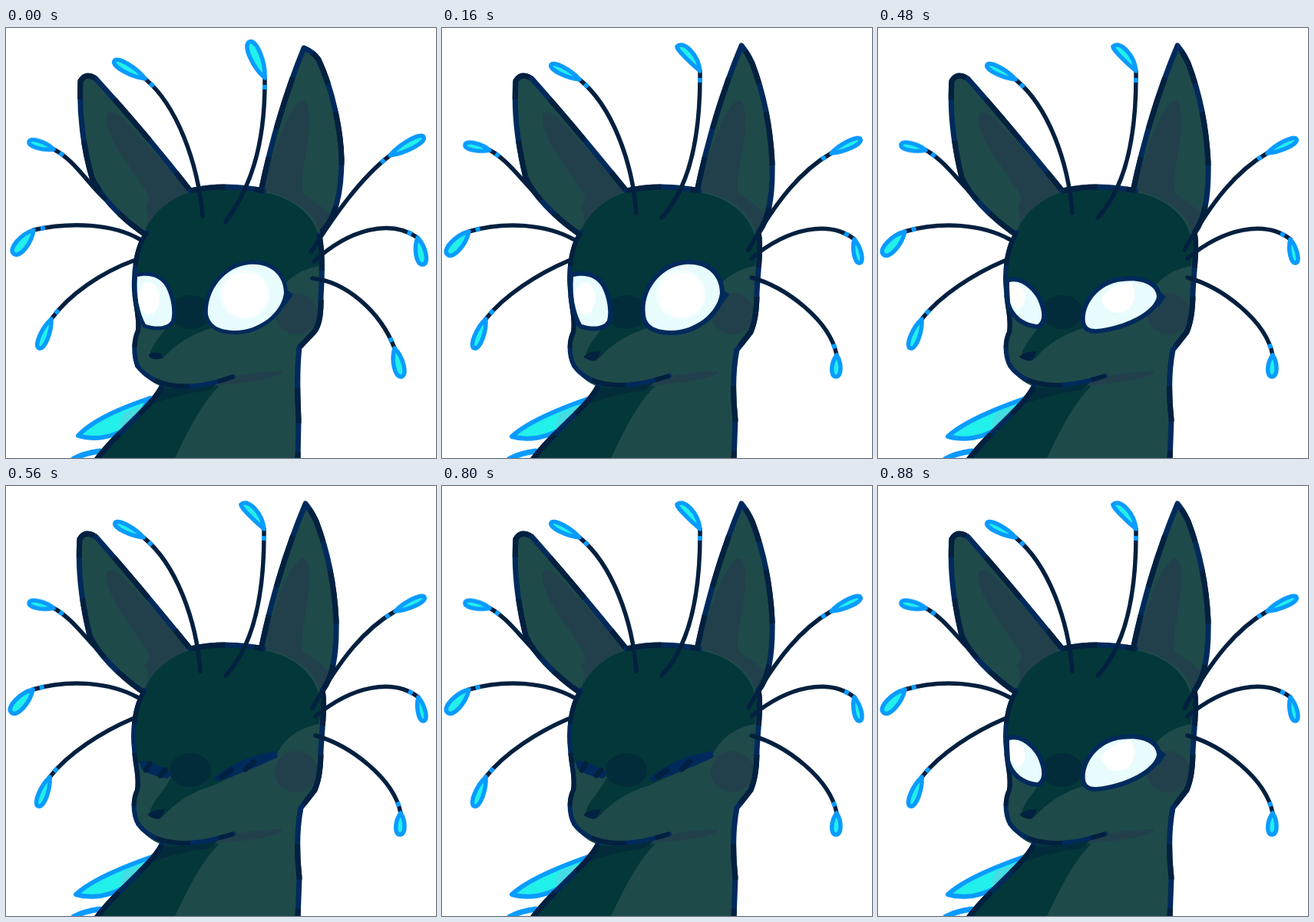
Animation of 560 by 560 pixels, one loop 960 ms. Source, as an HTML page:

```html
<!DOCTYPE html>
<html lang="en">
<head>
<meta charset="utf-8">
<title>Blinking creature</title>
<style>
  html, body { margin: 0; width: 100%; height: 100%; overflow: hidden; background: #fff; }
  svg { display: block; width: 100vw; height: 100vh; }
</style>
</head>
<body>
<svg id="stage" viewBox="0 0 560 560"></svg>
<script>
const LOOP = 960;
const C = {
  skin: '#1f4a4a', dark: '#043739', shade: '#22404c', brow: '#022c3a',
  line: '#002a5c', ink: '#02203f', blue: '#0a9bff', cyan: '#22f0ea',
  eye: '#e8fcfd'
};

const fill = (d, color) => `<path d="${d}" fill="${color}"/>`;
const stroke = (d, color, width, dash = '') =>
  `<path d="${d}" fill="none" stroke="${color}" stroke-width="${width}" stroke-linecap="${dash ? 'butt' : 'round'}" stroke-linejoin="round" stroke-dasharray="${dash}"/>`;
const outline = (d, width = 7) => stroke(d, C.line, width) + stroke(d, C.ink, width, '46 38 70 54');
const oval = (x, y, rx, ry, color, turn = 0) =>
  `<ellipse cx="${x}" cy="${y}" rx="${rx}" ry="${ry}" fill="${color}" transform="rotate(${turn} ${x} ${y})"/>`;

// A teardrop from its narrow base to its round tip, optionally bent sideways
function bulb(x, y, tipX, tipY, w, bend = 0) {
  const len = Math.hypot(tipX - x, tipY - y);
  const turn = Math.atan2(tipY - y, tipX - x) * 180 / Math.PI;
  return `<path d="M0 0C${len * .35} ${bend - w} ${len} ${bend - w * 1.15} ${len} 0C${len} ${bend + w * 1.15} ${len * .35} ${bend + w} 0 0Z"
    transform="translate(${x} ${y}) rotate(${turn})" fill="${C.cyan}" stroke="${C.blue}" stroke-width="5.5" stroke-linejoin="round"/>`;
}

// [stem curve to the head, base x, base y, tip x, tip y, bulb width, bend]
const antennae = [
  [
    ['C223 101 250 176 256 245', 181, 66, 141, 43, 7],
    ['C338 157 316 212 286 252', 337, 65, 317, 18, 9],
    ['C88 171 104 199 128 222', 62, 158, 30, 148, 6],
    ['C85 252 139 255 174 275', 36, 263, 10, 294, 9],
    ['C83 346 125 318 166 303', 59, 379, 43, 417, 7],
    ['C461 196 427 245 397 292', 500, 166, 544, 142, 7],
    ['C500 248 447 262 401 304', 536, 273, 543, 308, 8],
    ['C488 370 443 330 399 326', 506, 417, 515, 454, 8]
  ], [
    ['C222 102 248 175 253 241', 179, 67, 142, 48, 6],
    ['C337 157 317 214 286 247', 336, 56, 306, 24, 7, 5],
    ['C85 171 104 199 128 222', 62, 159, 30, 152, 6],
    ['C84 251 136 256 171 275', 35, 265, 7, 295, 9],
    ['C81 348 125 320 165 303', 57, 379, 42, 417, 7],
    ['C467 186 436 224 399 289', 507, 163, 545, 145, 6],
    ['C504 250 451 260 403 300', 537, 275, 544, 306, 6],
    ['C505 380 447 337 403 325', 514, 426, 513, 454, 7]
  ]
];

function antenna([curve, x, y, ...drop]) {
  const stem = `M${x} ${y}${curve}`;
  return stroke(stem, C.ink, 5.5) + stroke(stem, C.blue, 6, '0 9 6 999') + bulb(x, y, ...drop);
}

const leftEar = [
  'M183 270C145 245 122 216 112 195C101 158 95 112 97 69Q104 57 117 66C149 101 200 160 240 212',
  'M181 270C143 244 118 215 109 195C100 158 93 112 96 69Q103 57 117 66C148 101 198 160 240 212'
];
const rightEar = [
  'M332 213C343 160 361 92 388 26Q400 31 407 41C425 79 436 132 437 170C437 217 429 251 408 268',
  'M332 213C343 160 361 92 390 23Q398 33 404 46C419 85 428 132 430 175C431 222 425 252 410 269'
];
const side = [
  'M408 270C412 290 412 320 410 350Q411 385 401 396L382 416C378 450 380 482 381 510L380 564',
  'M412 266C416 285 412 308 410 345Q410 378 402 396L384 419C378 450 379 482 382 510L380 564'
];
const fin = [
  'M188 482C152 494 112 511 94 531C122 540 160 527 170 508Z',
  'M190 483C150 497 110 514 91 532C122 541 158 526 170 508Z'
];
const muzzle = [
  'M184 266C169 284 166 318 167 342C169 364 174 378 172 394C167 405 165 423 171 440C191 466 231 477 296 454',
  'M181 266C168 284 164 318 167 342C168 364 174 378 171 396C166 406 164 424 172 440C191 466 231 474 296 453'
];
const crown = 'M240 212Q286 202 335 212';
const nape = 'M203 467C188 496 148 522 118 562';
const body = 'M184 267C210 225 235 212 240 212Q286 202 335 212C379 220 410 246 411 278L409 385L382 416L380 560H118C148 522 188 496 203 467C177 458 160 433 172 394C164 350 162 305 184 267Z';
const mask = 'M180 268C189 237 224 217 240 214Q286 203 335 214C376 221 406 246 410 284L408 310C374 316 358 336 352 352L270 390C240 399 221 412 204 431L187 428C188 412 207 397 215 379L171 360C165 321 167 291 180 268Z';

function figure(i) {
  return [
    `<path d="${fin[i]}" fill="${C.cyan}" stroke="${C.blue}" stroke-width="6" stroke-linejoin="round"/>`,
    fill('M153 502L179 491L166 510L147 521Z', '#45dce3'),
    stroke('M88 561Q101 554 122 551', C.blue, 7),
    fill(leftEar[i] + 'Z', C.skin),
    fill('M131 112Q137 104 153 119L240 213L180 263C187 251 186 242 181 234C195 217 178 211 169 192C144 159 128 130 131 112Z', C.shade),
    fill(rightEar[i] + 'Z', C.skin),
    fill('M333 213C350 160 363 113 384 94Q394 91 395 117C397 155 380 193 387 216Q406 228 424 244L408 268Z', C.shade),
    outline(leftEar[i]), outline(rightEar[i]),
    fill(body, C.skin), fill(muzzle[i], C.skin),
    fill('M203 466H278C254 489 236 527 220 560H118C148 522 188 496 203 466Z', C.dark),
    fill('M200 469Q250 469 296 454Q335 446 360 447C359 457 310 462 278 465Q219 478 192 490Z', C.shade),
    fill('M200 469Q240 469 276 462L264 472Q222 477 192 490Z', C.brow),
    fill(mask, C.dark),
    oval(378, 372, 28, 27, C.shade), oval(240, 370, 27, 22, C.brow),
    outline(crown), outline(side[i]), outline(nape), outline(muzzle[i], 6),
    i ? fill('M184 428Q192 421 207 421L201 433Q192 435 184 428Z', C.ink)
      : oval(195, 427, 9, 4.5, C.ink, 5),
    ...antennae[i].map(antenna)
  ].join('');
}

// The rim lies outside the white
const eyeball = (d, rim) =>
  `<path d="${d}" fill="${C.eye}" stroke="${C.line}" stroke-width="${rim * 2}" stroke-linejoin="round" paint-order="stroke"/>`;

function openEyes(dx, rim) {
  return eyeball('M171 324C188 320 201 325 208 337C216 352 218 371 215 381C210 390 195 390 182 386C174 372 169 350 171 324Z', rim) +
    oval(186, 352, 14, 21, '#fff') +
    eyeball(`M${263 + dx} 373C261 342 285 311 316 308C344 305 362 322 362 345C359 372 328 394 299 394C279 394 266 388 ${263 + dx} 373Z`, rim) +
    fill('M364 339L374 347L362 364Z', C.line) +
    oval(311, 347, 33, 32, '#f4feff') + oval(312, 348, 29, 29, '#fff');
}

const halfEyes =
  eyeball('M171 331C188 327 202 343 208 354C215 370 215 381 208 386C190 385 176 373 172 357Z', 6) +
  fill('M171 332Q187 331 191 345Q194 361 181 367L172 354Z', '#fff') +
  eyeball('M270 383C267 362 286 333 318 330C346 326 363 337 363 350C360 367 330 383 303 389C281 394 272 393 270 383Z', 6) +
  fill('M365 341L375 350L365 364Z', C.line) +
  fill('M290 353Q304 333 330 331C341 351 329 371 313 371Q297 371 290 353Z', '#fff');

const closedEyes =
  fill('M174 358Q195 359 215 373L211 381Q188 378 176 368Z', C.line) +
  stroke('M182 370L187 362M201 377L207 370', C.ink, 7) +
  fill('M271 380Q303 353 352 345L354 353Q313 373 273 385Z', C.line) +
  stroke('M281 379L293 370M312 369L323 359', C.ink, 7);

// [start, pose, eyes]
const steps = [
  [0, 0, 'open0'], [160, 1, 'open1'], [320, 0, 'open0'], [480, 1, 'half'],
  [560, 1, 'closed'], [640, 0, 'closed'], [800, 1, 'closed'], [880, 1, 'half']
];
const layers = [
  [figure(0), s => s[1] === 0],
  [figure(1), s => s[1] === 1],
  [openEyes(0, 5), s => s[2] === 'open0'],
  [openEyes(2, 6), s => s[2] === 'open1'],
  [halfEyes, s => s[2] === 'half'],
  [closedEyes, s => s[2] === 'closed']
];

const stage = document.getElementById('stage');
stage.innerHTML = layers.map(([art]) => `<g>${art}</g>`).join('');
layers.forEach(([, shown], i) => {
  const frames = steps.map(s => ({ offset: s[0] / LOOP, opacity: shown(s) ? 1 : 0, easing: 'step-end' }));
  frames.push({ ...frames[frames.length - 1], offset: 1 });
  stage.children[i].animate(frames, { duration: LOOP, iterations: Infinity });
});
</script>
</body>
</html>
```
